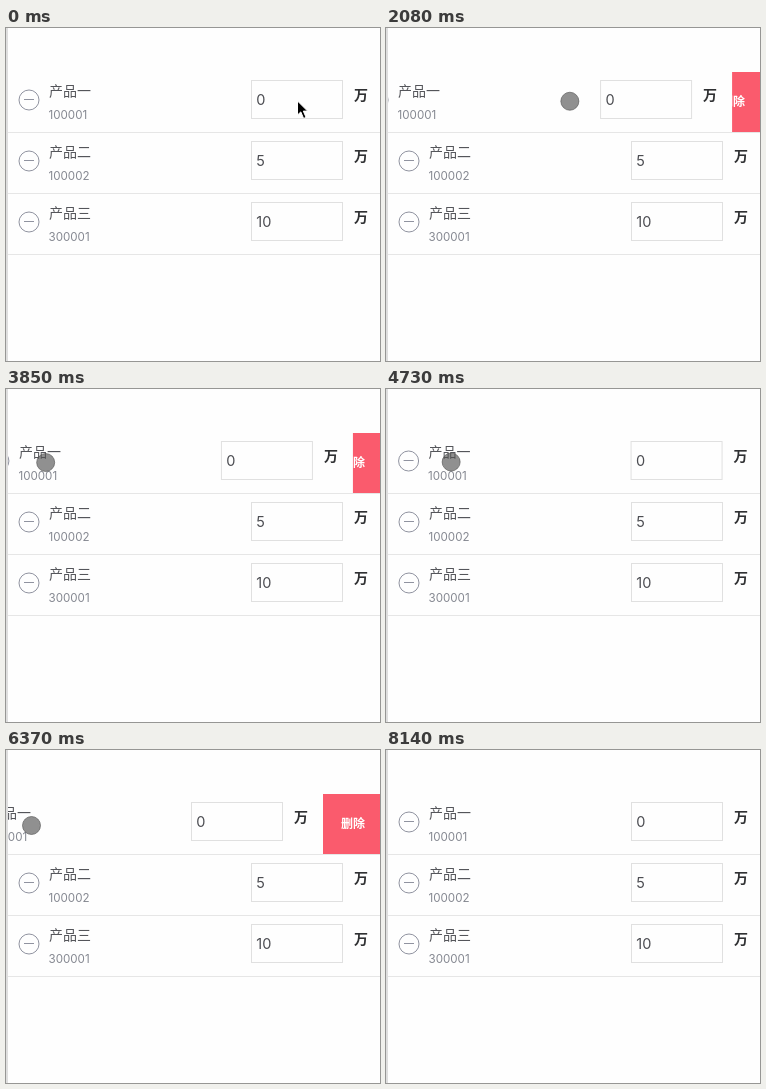
An HTML page for the animation above (9040 ms loop, 374 by 333 pixels).

```html
<!DOCTYPE html>
<html lang="zh">
<head>
<meta charset="utf-8">
<title>滑动删除</title>
<style>
  html, body { margin: 0; width: 100%; height: 100%; overflow: hidden; background: #fefefe; }
  svg { display: block; width: 374px; height: 333px; }
  text { font-family: "Noto Sans CJK SC", "Noto Sans CJK", sans-serif; }
  .name { font-size: 14px; fill: #54555a; }
  .code, .value { font-family: Inter, sans-serif; }
  .code { font-size: 11.6px; fill: #858891; }
  .value { font-size: 14.5px; fill: #4c4d52; }
  .unit { font-size: 14px; font-weight: 700; fill: #303133; }
  .del { font-size: 12px; font-weight: 700; fill: #fff; text-anchor: middle; }
  .minus { fill: none; stroke: #9093a0; }
  .box { fill: #fefefe; stroke: #e0e0e0; }
  #touch { fill: rgba(85, 85, 85, .65); stroke: rgba(85, 85, 85, .65); }
</style>
</head>
<body>
<svg viewBox="0 0 374 333">
  <rect x="317" y="44" width="60" height="60" fill="#fa5b6d"/>
  <text class="del" x="347" y="78">删除</text>
  <g id="list"></g>
  <path d="M2 104.5H374M2 165.5H374M2 226.5H374" stroke="#e6e6e6"/>
  <rect width="2" height="333" fill="#dedede"/>
  <circle id="touch" r="9"/>
  <path id="arrow" d="M291.5 73v14l3.3-3.1 2.8 6.5 2.5-1-2.8-6.3h4.3z" stroke="#fff"/>
</svg>
<script>
const LOOP = 9040, FRAME = 148;
const el = id => document.getElementById(id);

const row = ([name, code, value], i) => `
  <g transform="translate(0 ${i * 61})"><g class="slide">
    <rect x="2" y="44" width="375" height="60" fill="#fefefe"/>
    <g class="minus"><circle cx="23" cy="72" r="10"/><path d="M18 71.5h10"/></g>
    <text class="name" x="43" y="68">${name}</text>
    <text class="code" x="42.5" y="91">${code}</text>
    <rect class="box" x="245.5" y="52.5" width="91" height="38"/>
    <text class="value" x="250.3" y="77.3">${value}</text>
    <text class="unit" x="348" y="72">万</text>
  </g></g>`;

el('list').innerHTML = [
  ['产品一', '100001', '0'],
  ['产品二', '100002', '5'],
  ['产品三', '300001', '10'],
].map(row).join('');
const slide = document.querySelector('.slide');

// Each move eases the finger (x, y) and the row's shift to new places, timed in frames
const rest = { x: 286.5, y: 75.5, shift: 0 };
const moves = [
  { from: 4, to: 6, x: 207.5, y: 68.5 },
  { from: 7, to: 10, x: 221.5, y: 72.5 },
  { from: 12, to: 20, x: 146, y: 74, shift: -62 },
  { from: 20, to: 23, x: 14, y: 74, shift: -60 },
  { from: 24, to: 32, x: 65.5, y: 73, shift: 0 },
  { from: 33, to: 36, x: 20.5, y: 80.5 },
  { from: 37, to: 39, x: 86, y: 77 },
  { from: 39, to: 43, x: 25.5, y: 75.5, shift: -60 },
  { from: 46, to: 50, x: 122.5, y: 73, shift: 2 },
  { from: 50, to: 54, x: 321.5, y: 209.5, shift: 0 },
];
const easeOut = k => 1 - (1 - k) ** 2.4;

function poseAt(frame) {
  const pose = { ...rest };
  for (const { from, to, ...goal } of moves) {
    const k = easeOut(Math.min(1, Math.max(0, (frame - from) / (to - from))));
    for (const key in goal) pose[key] += (goal[key] - pose[key]) * k;
  }
  return pose;
}

const show = (node, on) => node.setAttribute('visibility', on ? 'visible' : 'hidden');
const move = (node, x, y) => node.setAttribute('transform', `translate(${x} ${y})`);
const start = performance.now();

function draw() {
  const now = Math.max(0, performance.now() - start) % LOOP;
  const frame = Math.floor(now / FRAME);
  const { x, y, shift } = poseAt(frame);
  move(slide, shift, 0);
  move(el('touch'), x, y);
  show(el('touch'), frame >= 4 && frame < 55);
  move(el('arrow'), 0, frame ? -3 : 0);
  show(el('arrow'), frame < 2);
  requestAnimationFrame(draw);
}
draw();
</script>
</body>
</html>
```
